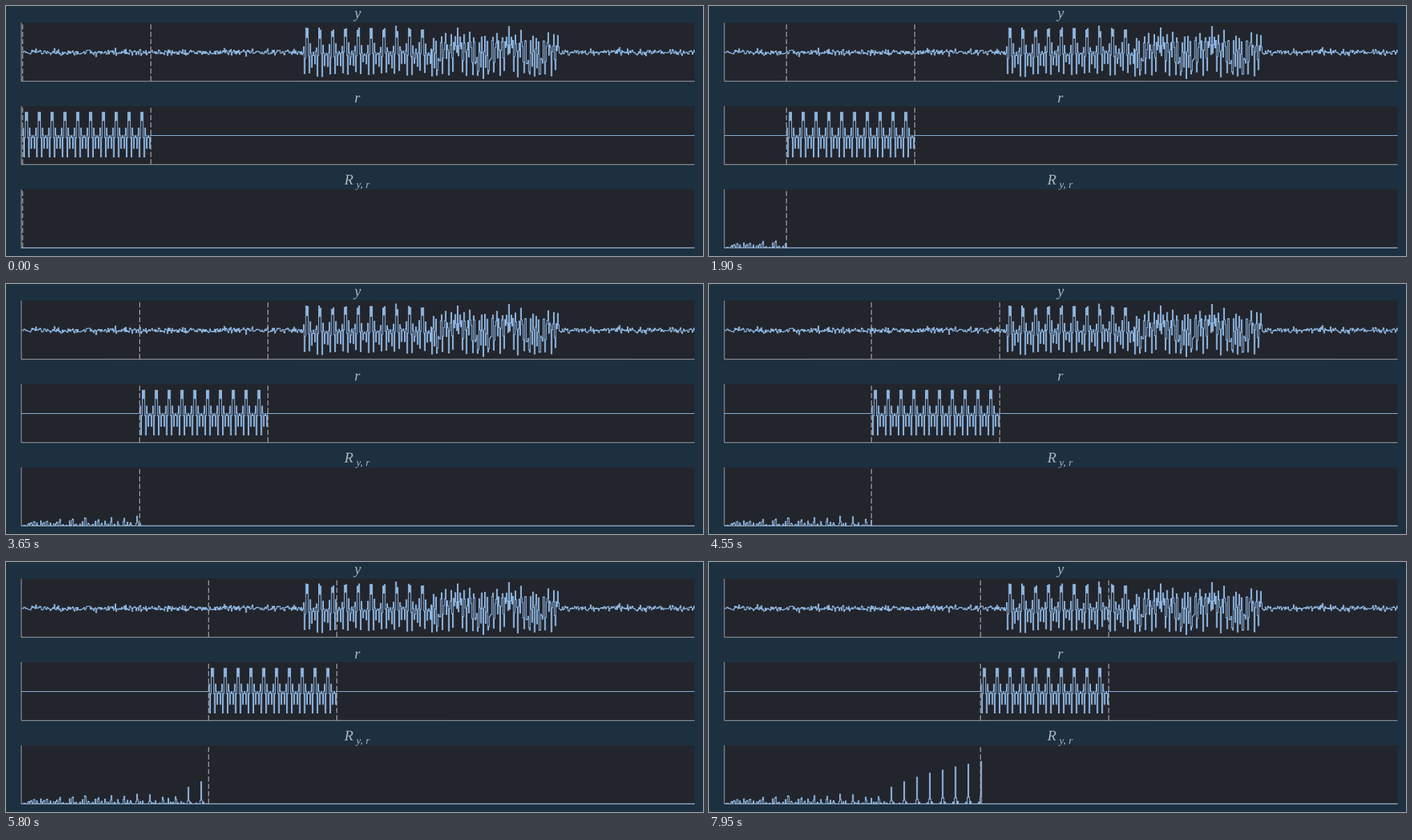
These frames come from a looping animation (1000 px wide and 360 px high, 8 s). An HTML page with a canvas:

```html
<!DOCTYPE html>
<html lang="en">
<head>
<meta charset="utf-8">
<title>Cross-correlation</title>
<style>
  html, body { margin: 0; width: 100%; height: 100%; overflow: hidden; background: #1c3040; }
  canvas { display: block; }
</style>
</head>
<body>
<canvas id="stage" width="1000" height="360"></canvas>
<script>
const ctx = document.getElementById('stage').getContext('2d');
const LEFT = 22, RIGHT = 988, HEIGHT = 84;
const X0 = 23.8, SHIFT = .4, PITCH = 1.15;
const TOTAL = 840, START = 350, REF_LEN = 160;
const GAIN = 234, STEP_MS = 50, STEPS = 160;
const Y_TOP = 24, R_TOP = 144, CORR_TOP = 264;
const TOPS = [Y_TOP, R_TOP, CORR_TOP];
const CURVE = '#93bde8', AXIS = '#aaabae', DASH = '#9fa0a2', LABEL = '#aeb6bd';

let seed = 11;
const rand = () => {
  seed = (seed * 1664525 + 1013904223) >>> 0;
  return seed / 4294967296;
};
const gauss = () => Math.sqrt(-2 * Math.log(1 - rand())) * Math.cos(2 * Math.PI * rand());

// Inverse DFT of signed carriers centred on zero
function symbol(signs, length, wave) {
  const mid = (signs.length - 1) / 2;
  return Array.from({ length }, (_, n) =>
    [...signs].reduce((sum, c, i) => {
      const sign = c === '+' ? 1 : c === '-' ? -1 : 0;
      return sum + sign * wave(2 * Math.PI * (i - mid) * n / length);
    }, 0) / 64);
}

// 802.11 short and long training symbols, real parts
const short = symbol('+-+--+0--++++', 16,
  a => Math.sqrt(13 / 6) * (Math.cos(a) - Math.sin(a)));
const long = symbol('++--++-+-++++++--++-+-++++0+--++-+-+-----++--+-+-++++', 64, Math.cos);

const ref = Array.from({ length: REF_LEN }, (_, i) => short[i % 16]);
const signal = Array.from({ length: TOTAL }, (_, i) => {
  const k = i - START;
  const clean = k < 0 || k >= 320 ? 0 : k < REF_LEN ? ref[k] : long[(k - REF_LEN + 32) % 64];
  return clean + gauss() * .0085;
});

// Normalised correlation, negative values cut off
const energy = values => values.reduce((sum, v) => sum + v * v, 0);
function correlate(lag) {
  const part = signal.slice(lag, lag + REF_LEN);
  const dot = part.reduce((sum, v, i) => sum + v * ref[i], 0);
  return Math.max(0, dot / Math.sqrt(energy(part) * energy(ref)));
}
const corr = Array.from({ length: 2 * STEPS }, (_, lag) => correlate(lag));

const xAt = i => X0 + i * PITCH;

function steps(values, zero, gain, first = 0) {
  const path = new Path2D();
  path.moveTo(LEFT, zero);
  path.lineTo(xAt(first) + SHIFT, zero);
  values.forEach((v, i) => {
    const x = xAt(first + i) + SHIFT, y = zero - v * gain;
    path.lineTo(x, y);
    path.lineTo(x + PITCH, y);
  });
  path.lineTo(xAt(first + values.length) + SHIFT, zero);
  path.lineTo(RIGHT, zero);
  return path;
}

const signalPath = steps(signal, 66.8, GAIN);

function text(str, x, y, size) {
  ctx.font = `italic ${size}px "Liberation Serif", serif`;
  ctx.fillText(str, x, y);
}

function panel(top) {
  ctx.fillStyle = '#23252d';
  ctx.fillRect(LEFT, top, RIGHT - LEFT, HEIGHT);
  ctx.strokeStyle = AXIS;
  ctx.lineWidth = 1;
  ctx.beginPath();
  ctx.moveTo(LEFT, top);
  ctx.lineTo(LEFT, top + HEIGHT + .3);
  ctx.lineTo(RIGHT, top + HEIGHT + .3);
  ctx.stroke();
}

function curve(path, top) {
  ctx.save();
  ctx.beginPath();
  ctx.rect(LEFT, top, RIGHT - LEFT, HEIGHT + 1);
  ctx.clip();
  ctx.strokeStyle = CURVE;
  ctx.lineWidth = 1.1;
  ctx.stroke(path);
  ctx.restore();
}

function marker(x, top) {
  ctx.strokeStyle = DASH;
  ctx.lineWidth = 1.4;
  ctx.setLineDash([7.4, 3.2]);
  ctx.beginPath();
  ctx.moveTo(x, top + HEIGHT);
  ctx.lineTo(x, top);
  ctx.stroke();
  ctx.setLineDash([]);
}

function draw(n) {
  const lag = 2 * n;
  ctx.fillStyle = '#1c3040';
  ctx.fillRect(0, 0, 1000, 360);
  TOPS.forEach(panel);

  ctx.fillStyle = LABEL;
  text('y', 500, 17, 21);
  text('r', 500, 138.5, 21);
  text('R', 485.5, 257, 21);
  text('y,', 502.5, 261.5, 15);
  text('r', 516, 261.5, 15);

  curve(signalPath, Y_TOP);
  curve(steps(ref, 186.5, GAIN, lag), R_TOP);
  curve(steps(n ? corr.slice(0, lag + 1) : [], 348.3, 69), CORR_TOP);

  TOPS.forEach(top => marker(xAt(lag), top));
  marker(xAt(lag + REF_LEN), Y_TOP);
  marker(xAt(lag + REF_LEN), R_TOP);
}

let shown = -1;
function tick() {
  const n = Math.floor(performance.now() / STEP_MS) % STEPS;
  if (n !== shown) draw(shown = n);
  requestAnimationFrame(tick);
}
tick();
</script>
</body>
</html>
```
